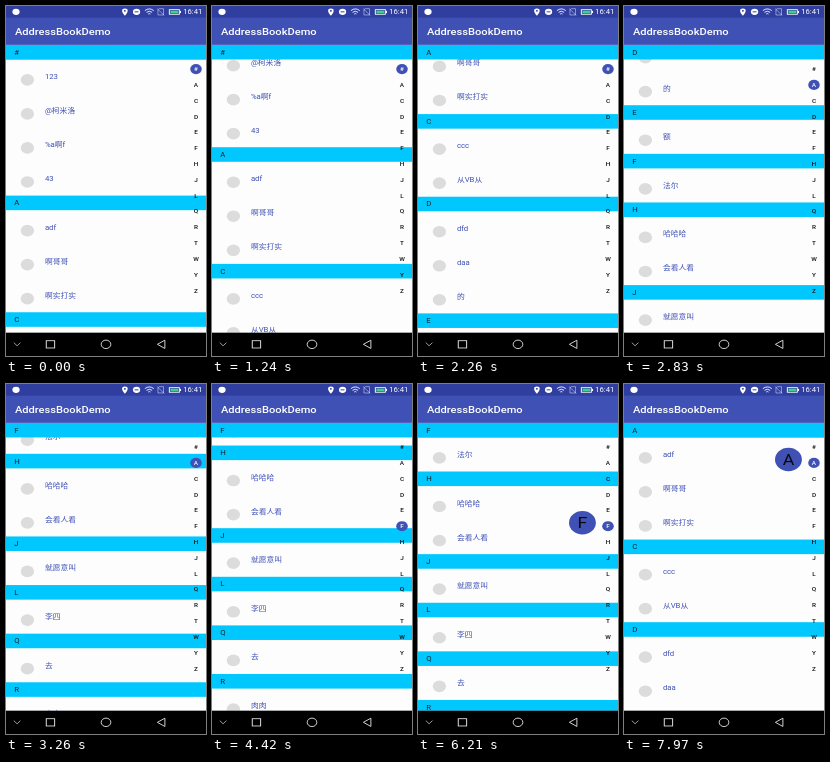
Write an HTML page that moves like this. It is 200 px wide and 350 px high and loops after 8000 ms.

```html
<!DOCTYPE html>
<html lang="zh">
<head>
<meta charset="utf-8">
<title>AddressBookDemo</title>
<style>
  html, body { margin: 0; width: 100%; height: 100%; overflow: hidden; background: #fdfdfd; }
  svg { display: block; width: 100%; height: 100%; font-family: Roboto, "Noto Sans CJK SC", "Noto Sans CJK", sans-serif; }
  .row { font-size: 14px; fill: #3f51b5; }
  .head { font-size: 14px; fill: #1c2226; }
  .index { font-size: 11.5px; font-weight: 500; text-anchor: middle; fill: #111; }
  .line { fill: none; stroke: #fff; stroke-width: 1.7; }
  .nav { fill: none; stroke: #ddd; stroke-width: 1.8; }
</style>
</head>
<body>
<!-- Laid out in dp on a 360 x 720 screen, squeezed into the stage -->
<svg viewBox="0 0 360 720" preserveAspectRatio="none">
  <defs><clipPath id="window"><rect y="80" width="360" height="592"/></clipPath></defs>
  <rect width="360" height="720" fill="#fdfdfd"/>
  <g clip-path="url(#window)">
    <g id="list"></g>
    <g id="sticky"></g>
  </g>
  <g id="bar"><circle id="mark" cx="342" r="10.4" fill="#3f51b5"/></g>
  <g id="bubble">
    <circle cx="296" r="24.2" fill="#3f51b5"/>
    <text id="big" x="296" y="11.500" font-size="32" text-anchor="middle" fill="#080808"></text>
  </g>

  <rect width="360" height="80" fill="#3f51b5"/>
  <rect width="360" height="24" fill="#303f9f"/>
  <text x="16" y="59" font-size="20" font-weight="500" fill="#fff">AddressBookDemo</text>
  <circle cx="18" cy="12" r="6.5" fill="#fff"/>
  <path d="M214 20C210.500 15.500 209 13 209 10a5 5 0 0 1 10 0C219 13 217.500 15.500 214 20Z" fill="#fff"/>
  <circle cx="214" cy="10" r="1.800" fill="#303f9f"/>
  <circle cx="235" cy="12" r="6.500" fill="#fff"/>
  <path d="M231.500 12h7" stroke="#303f9f" stroke-width="2"/>
  <path d="M250 9.500q8-7 16 0M253 13q5-4.500 10 0M256 16.500q2-2 4 0" class="line"/>
  <path d="M276 5.500h7.500v13h-10v-10.500ZM272 5.500l13 14" class="line" opacity=".5"/>
  <rect x="294" y="7.500" width="18" height="9.500" class="line"/>
  <rect x="296" y="9.500" width="14" height="5.500" fill="#3fd08a"/>
  <path d="M313 10h2v4.500h-2z" fill="#fff"/>
  <text x="319" y="17" font-size="13.800" fill="#fff">16:41</text>

  <rect y="672" width="360" height="48" fill="#000"/>
  <path d="M14 692.500l6 6.500 6-6.500" class="nav" opacity=".75"/>
  <rect x="72.500" y="688.500" width="15" height="15" class="nav"/>
  <circle cx="180" cy="696" r="8.700" class="nav"/>
  <path d="M286 687.500v17l-13.500-8.500Z" class="nav"/>
</svg>
<script>
const LOOP = 8000, TOP = 80, HEAD = 30, ROW = 70;
const sections = [
  ['#', '123', '@柯米洛', '%a啊f', '43'],
  ['A', 'adf', '啊哥哥', '啊实打实'],
  ['C', 'ccc', '从VB从'],
  ['D', 'dfd', 'daa', '的'],
  ['E', '额'], ['F', '法尔'],
  ['H', '哈哈哈', '会看人看'],
  ['J', '就愿意叫'], ['L', '李四'], ['Q', '去'], ['R', '肉肉'],
  ['T', '天天'], ['W', '我'], ['Y', '一样'], ['Z', '在']
];
const $ = id => document.getElementById(id);

function add(parent, tag, attrs, text = '') {
  const node = document.createElementNS('http://www.w3.org/2000/svg', tag);
  for (const key in attrs) node.setAttribute(key, attrs[key]);
  node.textContent = text;
  return parent.appendChild(node);
}

function addHeader(parent, y, text) {
  add(parent, 'rect', { y, width: 360, height: HEAD, fill: '#00c8ff' });
  return add(parent, 'text', { x: 15, y: y + 20, class: 'head' }, text);
}

const offsets = [];
let y = 0;
for (const [letter, ...names] of sections) {
  offsets.push(y);
  addHeader($('list'), y, letter);
  y += HEAD;
  for (const name of names) {
    add($('list'), 'circle', { cx: 38.5, cy: y + 42, r: 12, fill: '#dcdcdc' });
    add($('list'), 'text', { x: 70, y: y + 40, class: 'row' }, name);
    y += ROW;
  }
}
const stickyText = addHeader($('sticky'), 0, '');

const letterY = i => 129.8 + i * 32.54;
const letters = sections.map(([letter], i) =>
  add($('bar'), 'text', { x: 342, y: letterY(i) + 4.1, class: 'index' }, letter));

// Flings: start, end, scroll before, scroll after
const flings = [
  [1120, 1840, 0, 234.6],
  [1940, 2340, 234.6, 409],
  [2570, 3550, 409, 1114.5],
  [4420, 5320, 1114.5, 788]
];
const DRAG = 5790, TURN = 6690, DRAG_END = 7970;

function flingScroll(t) {
  let scroll = 0;
  for (const [start, end, from, to] of flings) {
    if (t < start) break;
    const p = Math.min(1, (t - start) / (end - start));
    scroll = from + (to - from) * (1 - (1 - p) ** 3);
  }
  return scroll;
}

// The finger slides from D down to L, then back up to A.
function draggedLetter(t) {
  const pos = t < TURN
    ? 3 + 5 * (t - DRAG) / (TURN - DRAG)
    : 8 - 7 * Math.min(1, (t - TURN) / (DRAG_END - TURN));
  return Math.round(pos);
}

// The index follows a fling only once the list is at rest.
const restingLetter = t => t < 2340 ? 0 : t < 3550 ? 1 : t < 5320 ? 5 : 3;

function draw(t) {
  const dragging = t >= DRAG;
  const active = dragging ? draggedLetter(t) : restingLetter(t);
  const scroll = dragging ? offsets[active] : flingScroll(t);

  $('list').setAttribute('transform', `translate(0 ${TOP - scroll})`);
  const current = offsets.findLastIndex(offset => offset <= scroll);
  const push = Math.min(0, (offsets[current + 1] ?? Infinity) - scroll - HEAD);
  $('sticky').setAttribute('transform', `translate(0 ${TOP + push})`);
  stickyText.textContent = sections[current][0];

  $('mark').setAttribute('cy', letterY(active));
  letters.forEach((node, i) => { node.style.fill = i === active ? '#fff' : ''; });
  $('bubble').style.display = dragging ? '' : 'none';
  $('bubble').setAttribute('transform', `translate(0 ${letterY(active) - 7})`);
  $('big').textContent = sections[active][0];
}

const begin = performance.now();
function tick(now) {
  draw(Math.max(0, now - begin) % LOOP);
  requestAnimationFrame(tick);
}
draw(0);
requestAnimationFrame(tick);
</script>
</body>
</html>
```
